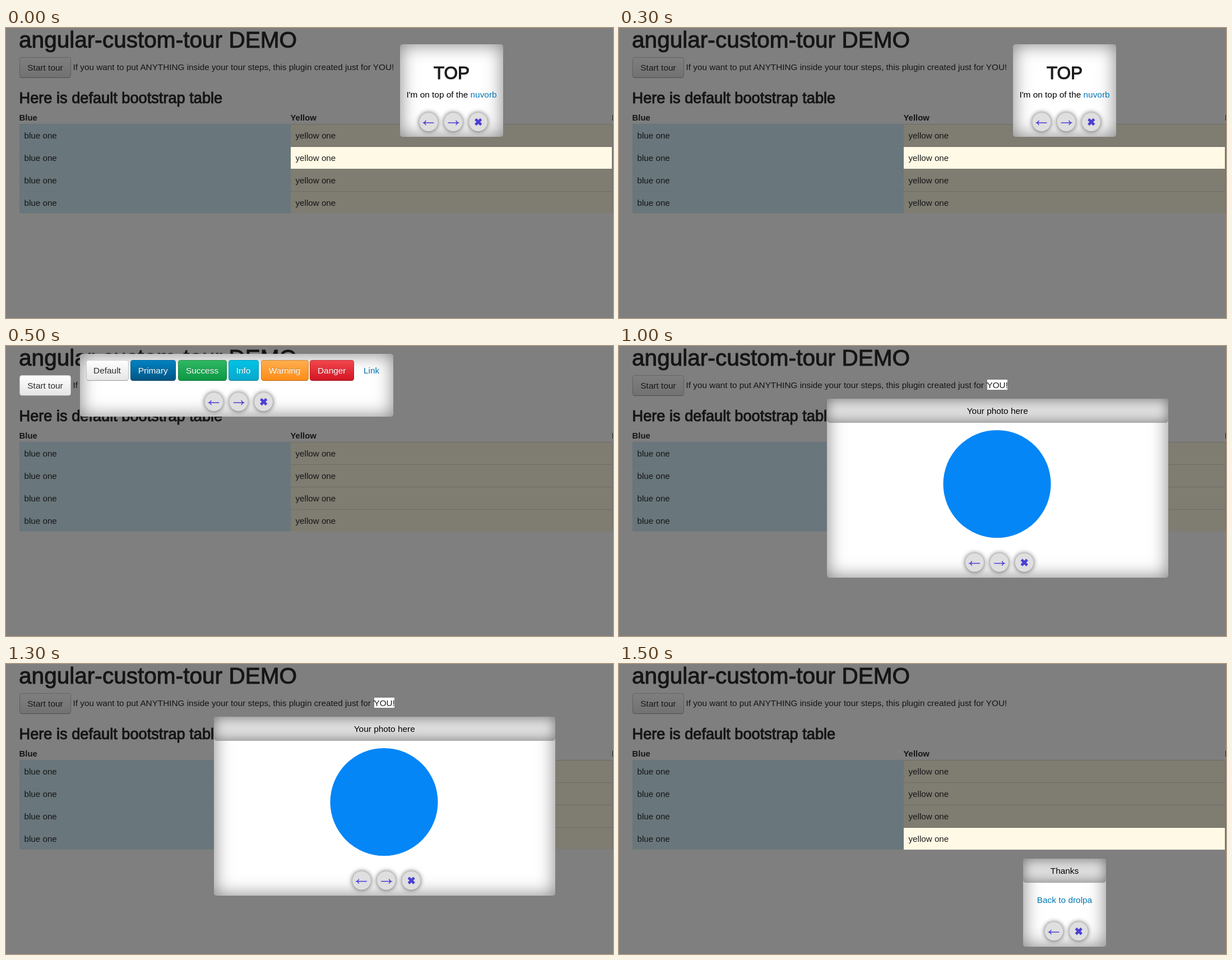
These frames come from a looping animation (1083 px wide and 517 px high, 2000 ms). An HTML page:

```html
<!DOCTYPE html>
<html lang="en">
<head>
<meta charset="utf-8">
<title>Custom tour demo</title>
<style>
  html, body { margin: 0; width: 100%; height: 100%; overflow: hidden; background: #fff; }
  body { position: relative; font: 15.4px/20px "Liberation Sans", Arial, sans-serif; color: #000; }
  svg { position: absolute; left: 0; top: 0; overflow: visible; }
  .page { width: 1083px; height: 517px; fill: #2a2a2a; }
  .page .medium { stroke: #2a2a2a; stroke-width: 1px; }
  .cell { font-size: 15.2px; }
  .head { font-size: 14.9px; font-weight: bold; }
  .shade { position: absolute; inset: 0; background: rgba(0, 0, 0, .5); }

  .step { position: absolute; inset: 0; opacity: 0; animation: show 2s step-end infinite; animation-delay: calc(var(--i) * .5s - 2s); }
  @keyframes show { 0% { opacity: 1; } 25%, 100% { opacity: 0; } }

  .panel, .btn, .lit, .line { position: absolute; box-sizing: border-box; left: var(--x); top: var(--y); width: var(--w); height: var(--h); }
  .line { white-space: nowrap; text-align: center; width: 100%; left: 0; }
  .panel { background: #fff; border-radius: 5px; box-shadow: inset 0 0 32px rgba(0, 0, 0, .5); }
  .title { height: 43px; line-height: 43px; text-align: center; background: #e0e0e0; border-radius: 5px; box-shadow: inset 0 0 22px rgba(0, 0, 0, .5); }
  .top { font-size: 31.5px; line-height: 40px; color: #1c1c1c; -webkit-text-stroke: 1.1px #1c1c1c; }
  .link { color: #0076b5; }
  .lit { background: #fff9e5; color: #1c1c1c; white-space: nowrap; font-size: 15.2px; }
  .row { --x: 508px; --w: 573px; --h: 38.5px; padding-left: 8.5px; line-height: 39px; }

  .btn { height: 37px; line-height: 36px; text-align: center; white-space: nowrap; border: 1px solid rgba(0, 0, 0, .2); border-bottom-color: rgba(0, 0, 0, .32);
    border-radius: 4.5px; background: linear-gradient(var(--a), var(--b)) border-box; color: #fff; text-shadow: 0 -1px rgba(0, 0, 0, .25); }
  .plain { --a: #fff; --b: #e4e4e4; color: #2a2a2a; text-shadow: 0 1px rgba(255, 255, 255, .75); }
  .start { --x: 24px; --y: 52px; --w: 92px; }

  .dot { fill: #dfdfdf; filter: drop-shadow(0 0 4px rgba(0, 0, 0, .65)); }
  .arrow { fill: none; stroke: #4b3fd4; stroke-width: 1.6; }
  .cross { fill: none; stroke: #4b3fd4; stroke-width: 4.6; }
</style>
</head>
<body>
<svg class="page">
  <defs>
    <g id="prev"><circle class="dot" r="16.5"/><path class="arrow" d="M9.3 1.5H-8.3M-4.8 -2.5Q-6 .6 -8.8 1.5Q-6 2.4 -4.8 5.5"/></g>
    <g id="next"><circle class="dot" r="16.5"/><path class="arrow" d="M-9.3 1.5H8.3M4.8 -2.5Q6 .6 8.8 1.5Q6 2.4 4.8 5.5"/></g>
    <g id="close"><circle class="dot" r="16.5"/><path class="cross" d="M-4.8 -5L5.2 5M5.2 -5L-4.8 5"/></g>
  </defs>
  <text class="medium" x="23" y="35" font-size="40.6">angular-custom-tour DEMO</text>
  <text x="119.5" y="75" font-size="15.3">If you want to put ANYTHING inside your tour steps, this plugin created just for YOU!</text>
  <text class="medium" x="23.5" y="134" font-size="27.2">Here is default bootstrap table</text>
  <g class="head">
    <text x="23.5" y="165">Blue</text>
    <text x="507.5" y="165">Yellow</text>
    <text x="1081" y="165">Red</text>
  </g>
  <g id="rows" class="cell"></g>
</svg>
<div class="btn plain start">Start tour</div>
<div class="shade"></div>

<div class="step" style="--i:0">
  <div class="lit row" style="--y:212px">yellow one</div>
  <div class="panel" style="--x:703px;--y:29px;--w:184px;--h:165px">
    <div class="line top" style="--y:31px">TOP</div>
    <div class="line" style="--y:80px">I'm on top of the <span class="link">nuvorb</span></div>
    <svg><use href="#prev" x="51" y="138.5"/><use href="#next" x="95" y="138.5"/><use href="#close" x="139.5" y="138.5"/></svg>
  </div>
</div>

<div class="step" style="--i:1">
  <div class="btn plain start">Start tour</div>
  <div class="panel" style="--x:132px;--y:14px;--w:559px;--h:112px">
    <div class="btn plain" style="--x:10.5px;--y:11px;--w:76px">Default</div>
    <div class="btn" style="--x:90px;--y:11px;--w:80.5px;--a:#0083c3;--b:#005584">Primary</div>
    <div class="btn" style="--x:174.5px;--y:11px;--w:87px;--a:#30b862;--b:#0b9743">Success</div>
    <div class="btn" style="--x:264.5px;--y:11px;--w:54px;--a:#00c3e5;--b:#08a8cc">Info</div>
    <div class="btn" style="--x:322.5px;--y:11px;--w:85px;--a:#ffae50;--b:#ff8c16">Warning</div>
    <div class="btn" style="--x:410px;--y:11px;--w:78.5px;--a:#f2474d;--b:#d21523">Danger</div>
    <div class="line link" style="--y:20px;left:506px;width:28px">Link</div>
    <svg><use href="#prev" x="239" y="85.5"/><use href="#next" x="283" y="85.5"/><use href="#close" x="327.5" y="85.5"/></svg>
  </div>
</div>

<div class="step" style="--i:2">
  <div class="lit" style="--x:656.5px;--y:60px;--w:36.5px;--h:18px;background:#fff;text-align:center">YOU!</div>
  <div class="panel" style="--x:370.5px;--y:94px;--w:609.5px;--h:319px">
    <div class="title">Your photo here</div>
    <svg>
      <circle cx="303.5" cy="152" r="96" fill="#0486f6"/>
      <use href="#prev" x="263.5" y="292"/><use href="#next" x="307.5" y="292"/><use href="#close" x="352" y="292"/>
    </svg>
  </div>
</div>

<div class="step" style="--i:3">
  <div class="lit row" style="--y:292px">yellow one</div>
  <div class="panel" style="--x:721px;--y:347px;--w:148px;--h:156.5px">
    <div class="title">Thanks</div>
    <div class="line link" style="--y:64px">Back to drolpa</div>
    <svg><use href="#prev" x="55" y="129.5"/><use href="#close" x="99" y="129.5"/></svg>
  </div>
</div>

<script>
  const columns = [
    { x: 24, w: 484, fill: '#d3eefa', line: '#cde7f2', label: 'blue one' },
    { x: 508, w: 573.5, fill: '#fff9e5', line: '#dedacb', label: 'yellow one' },
    { x: 1081.5, w: 2, fill: '#f2dede', line: '#ddd', label: '' }
  ];
  let markup = '';
  for (const c of columns) {
    for (let row = 0; row < 4; row++) {
      const y = 171 + row * 40;
      markup += `<rect x="${c.x}" y="${y}" width="${c.w}" height="${row < 3 ? 40 : 39.5}" fill="${c.fill}"/>
        <rect x="${c.x}" y="${y}" width="${c.w}" height="1" fill="${c.line}"/>
        <text x="${c.x + 8.5}" y="${y + 26}">${c.label}</text>`;
    }
  }
  document.getElementById('rows').innerHTML = markup;
</script>
</body>
</html>
```
